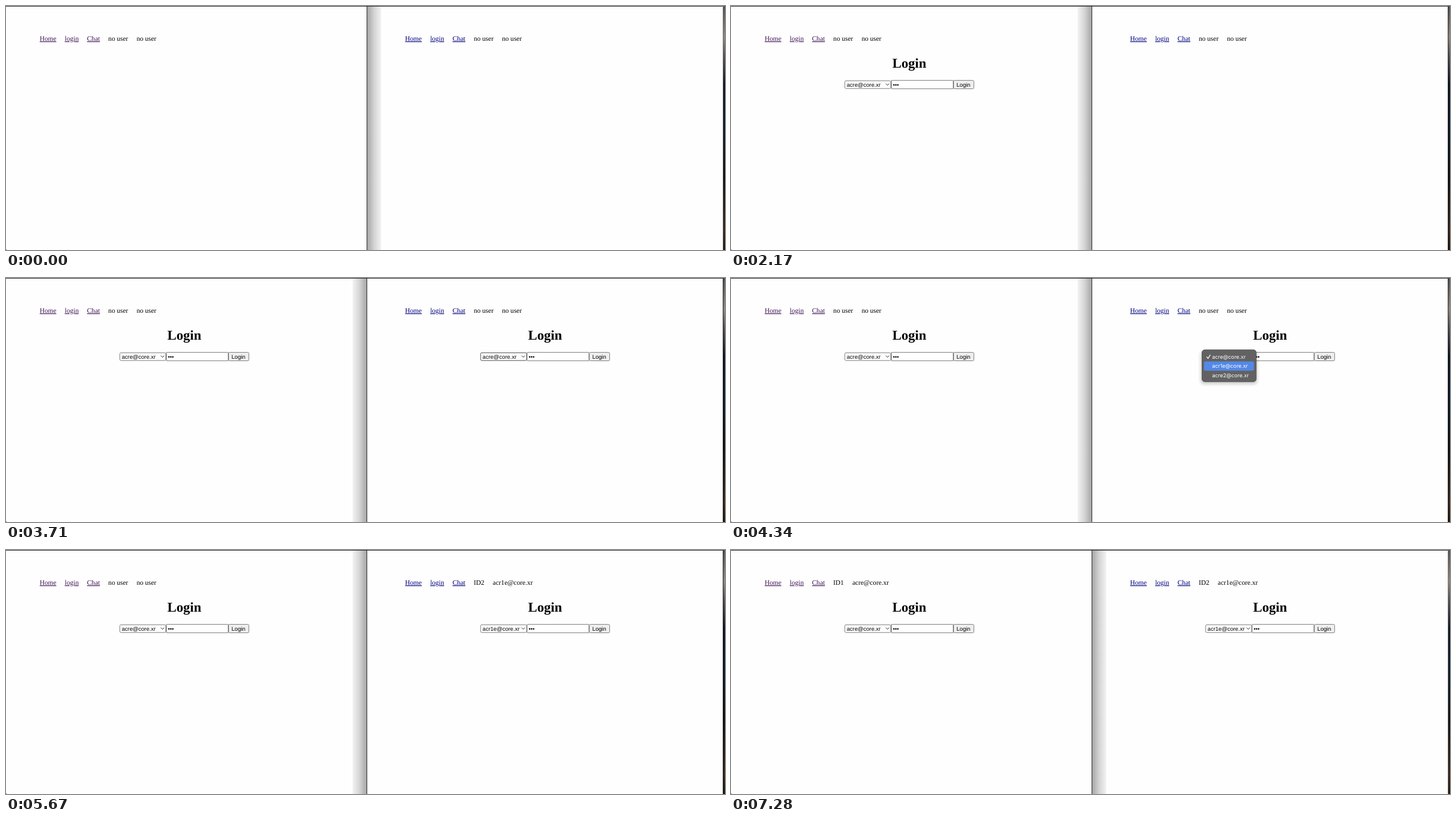
Write an HTML page that moves like this. It is 1280 by 435 pixels and loops after 8000 ms.

```html
<!DOCTYPE html>
<html lang="en">
<head>
<meta charset="utf-8">
<title>Login in two windows</title>
<style>
  html, body { margin: 0; width: 100%; height: 100%; overflow: hidden; background: #fefefe; }
  svg { display: block; width: 1280px; height: 435px; }
  text { white-space: pre; text-rendering: geometricPrecision; }
  .nav { font: 12.08px "Liberation Serif", Times, serif; }
  .link { text-decoration: underline; }
  .title { font: bold 24.15px "Liberation Serif", Times, serif; }
  .ui { font: 10.06px "Liberation Sans", Arial, sans-serif; }
  .menu { font: 9.4px Inter, sans-serif; fill: #fff; }
</style>
</head>
<body>
<svg viewBox="0 0 1280 435">
  <defs>
    <linearGradient id="shade">
      <stop offset="0" stop-color="#a6a6a6"/>
      <stop offset=".5" stop-color="#d4d4d4"/>
      <stop offset="1" stop-color="#f3f3f3"/>
    </linearGradient>
    <linearGradient id="desk" x2="0" y2="1">
      <stop offset="0" stop-color="#55504d"/>
      <stop offset=".13" stop-color="#8c8581"/>
      <stop offset=".2" stop-color="#5b5450"/>
      <stop offset=".32" stop-color="#0c1624"/>
      <stop offset=".5" stop-color="#0a1c2c"/>
      <stop offset=".7" stop-color="#10110f"/>
      <stop offset=".92" stop-color="#3a2517"/>
      <stop offset="1" stop-color="#1e1812"/>
    </linearGradient>
    <filter id="blur" x="-20%" y="-20%" width="140%" height="140%">
      <feGaussianBlur stdDeviation="2.5"/>
    </filter>
  </defs>
  <g id="scene"></g>
</svg>
<script>
const LOOP = 8000;
const USERS = ["acre@core.xr", "acr1e@core.xr", "acre2@core.xr"];
const scene = document.getElementById("scene");

const text = (cls, x, y, s, fill = "#000") =>
  `<text class="${cls}" x="${x}" y="${y}" fill="${fill}">${s}</text>`;
const rect = (x, y, w, h, fill, more = "") =>
  `<rect x="${x}" y="${y}" width="${w}" height="${h}" fill="${fill}" ${more}/>`;

// Value of the last [time, value] step that has begun
const at = (t, steps) => steps.reduce((v, [start, next]) => t >= start ? next : v, "");

function nav(x, color, active, id, user) {
  const link = (dx, s, c = color) => text("nav link", x + dx, 62, s, c);
  return link(0, "Home") + link(44.6, "login", active ? "#e00000" : color) + link(84.3, "Chat") +
    text("nav", x + 122.1, 62, id || "no user") +
    text("nav", x + (id ? 156 : 172.4), 62, user || "no user");
}

function form(x, user, hover) {
  const box = (name, bx, y, w, h, r, fill) =>
    rect(bx, y, w, h, fill, `rx="${r}" stroke="${hover.startsWith(name) ? "#444" : "#767676"}"`);
  const face = hover === "button!" ? "#f5f5f5" : hover === "button" ? "#e3e3e3" : "#efefef";
  return `<g transform="translate(${x})">` +
    text("title", 287.3, 110, "Login") +
    box("select", 202.7, 133.3, 81.8, 13.8, 2, "#fff") +
    text("ui", 206, 143.5, user) +
    `<path d="M275.6 138.4l3 3 3-3" fill="none" stroke="#222"/>` +
    box("field", 285.5, 132.6, 110, 15, .5, "#fff") +
    text("ui", 288.2, 143.5, "•••") +
    box("button", 396.3, 132.6, 36, 15, 2, face) +
    text("ui", 401.5, 143.5, "Login") + "</g>";
}

function menu(row, opacity) {
  return `<g opacity="${opacity}">` +
    rect(835.5, 130, 102, 60, "#000", `rx="7" opacity=".16" filter="url(#blur)"`) +
    rect(838.5, 128, 96.5, 57, "#626262", `rx="5" stroke="#555"`) +
    (row < 0 ? "" : rect(842, 132.1 + row * 16.6, 89, 16.6, "#5388e6", `rx="3"`)) +
    `<path d="M847 140.6l2.2 2.8 4-6.2" fill="none" stroke="#fff" stroke-width="1.3" stroke-linecap="round"/>` +
    USERS.map((u, i) => text("menu", 856.5, 143.6 + i * 16.6, u, "#fff")).join("") + "</g>";
}

function windows(rightFront) {
  const shadow = rightFront ? `transform="translate(1285) scale(-1 1)"` : "";
  return rect(643, 0, 25, 435, "url(#shade)", shadow) +
    rect(0, 0, 1277, 1, "#222") +
    rect(642, 0, 1, 435, "#222") +
    rect(1277, 0, 3, 435, "url(#desk)") +
    rect(1276, 0, 1, 435, rightFront ? "#222" : "#777") +
    rect(0, 434, 1, 1, "#333");
}

function draw(t) {
  const leftHover = at(t, [[6790, "button"], [6930, "button!"], [7000, "button"], [7280, ""]]);
  const rightHover = at(t, [
    [3150, "field"], [3290, "button"], [3640, "field"], [3710, "select"],
    [5110, "field"], [5180, "button"], [5320, "button!"], [5390, "button"],
    [5600, "field"], [5670, ""]
  ]);
  const row = at(t, [[0, -1], [3990, 0], [4340, 1], [4620, -1], [4760, 1]]);
  const fade = at(t, [[0, 0], [3990, 1], [4760, .7], [4830, .3], [4900, 0]]);
  const leftIn = t >= 7070, rightIn = t >= 5390;

  scene.innerHTML = windows(t >= 2170 && t < 6300) +
    nav(60, "#3f1457", t >= 490 && t < 630, leftIn && "ID1", leftIn && USERS[0]) +
    nav(710.6, "#00007e", t >= 2590 && t < 2730, rightIn && "ID2", rightIn && USERS[1]) +
    (t >= 630 ? form(0, USERS[0], leftHover) : "") +
    (t >= 2730 ? form(642.3, USERS[t >= 5040 ? 1 : 0], rightHover) : "") +
    (fade ? menu(row, fade) : "");
}

function tick() {
  draw(performance.now() % LOOP);
  requestAnimationFrame(tick);
}
tick();
</script>
</body>
</html>
```
